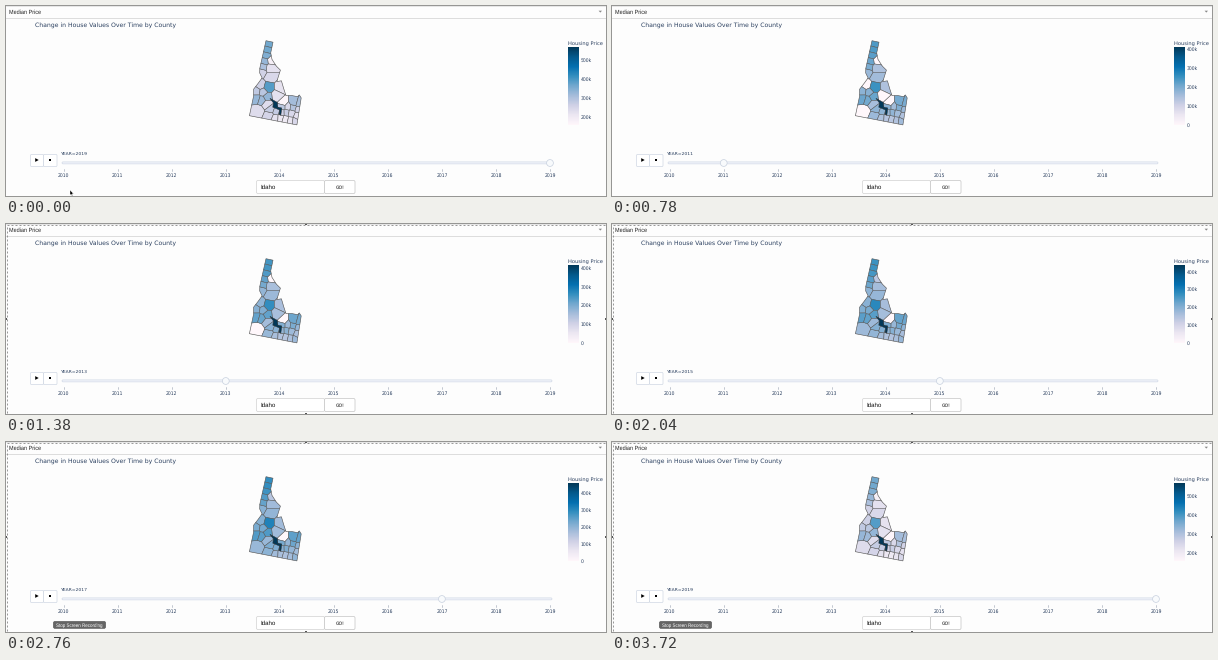
A matplotlib script that plays this animation: 600x190 px, repeating every 3.78 s.

```python
import numpy as np
import matplotlib.pyplot as plt
from matplotlib.animation import FuncAnimation
from matplotlib.patches import Circle, FancyBboxPatch, Polygon, Rectangle

W, H, DPI = 600, 190, 100
FRAMES, INTERVAL = 63, 60
PX = 72 / DPI
INK, RAIL = "#2a3f5f", "#c8d1df"
CMAP = plt.get_cmap("PuBu")
BAR_TOP, BAR_END = 41.5, 119.3
plt.rcParams["text.hinting"] = "none"

# State border, clockwise from the north-west corner
STATE = [(260, 34.7), (267, 36.2), (264.7, 46.9), (266, 53.4), (270.4, 60.2),
         (274.4, 64.1), (270.8, 75.6), (275.4, 74.8), (277.7, 82.6), (280, 89.7),
         (285.6, 89.5), (291.7, 90.7), (293.3, 88.9), (295.2, 91.9), (290.9, 118.9),
         (243.4, 109.7), (247.6, 90.1), (247.6, 83.2), (251.8, 77.8), (256.1, 71.9),
         (253.7, 67), (253.8, 62.3)]
BLAINE = [(263.9, 92.3), (271.5, 96.5), (271.8, 101.2), (275.8, 102), (274.8, 109.2),
          (273, 108.2), (273.6, 104), (266.8, 101.2), (267.4, 96.9)]
# Large counties: centre, 2019 price in thousands, first year with data
LARGE = {
    "Shoshone": (265, 54.5, 185, 2014), "Nez Perce": (256, 66, 260, 2010),
    "Clearwater": (264, 62, 225, 2010), "Idaho": (264, 70.5, 245, 2010),
    "Adams": (254.5, 79.5, 265, 2013), "Valley": (262, 81.5, 390, 2010),
    "Lemhi": (275, 81.5, 222, 2010), "Custer": (271, 90, 225, 2012),
    "Boise": (261, 91, 330, 2010), "Elmore": (261, 98, 235, 2010),
    "Owyhee": (252, 104.5, 235, 2014), "Butte": (277.5, 97, 165, 2019),
}


def small_counties():
    """Centres and prices of the panhandle stack and two jittered grids."""
    rng = np.random.default_rng(4)
    corner, east, north = np.array([(243.4, 109.7), (0.982, 0.19), (0.219, -0.976)])
    for y in np.linspace(38, 61, 5):
        yield 263 - 0.25 * (y - 38), y, 365 - 4 * max(0, y - 46), 2010

    def grid(cols, rows):
        for s in cols:
            for t in rows:
                ds, dt = rng.uniform(-0.9, 0.9, 2)
                yield s, t, corner + (s + ds) * east + (t + dt) * north

    for s, t, (x, y) in grid((2.5, 8), (18.5, 25)):
        yield x, y, 250 + 80 * rng.random(), 2010
    for s, t, (x, y) in grid(np.arange(20, 47, 5.2), np.arange(3.5, 22, 6)):
        if t < 0.45 * s + 4:
            yield x, y, 180 + 4 * t + 60 * rng.random(), 2010


def clip(poly, mid, normal):
    """Keep the part of a convex polygon behind the line through mid."""
    side = (poly - mid) @ normal
    out = []
    for i in range(len(poly)):
        a, b, da, db = poly[i - 1], poly[i], side[i - 1], side[i]
        if da * db < 0:
            out.append(a + (b - a) * da / (da - db))
        if db <= 0:
            out.append(b)
    return np.array(out)


def cell(i, centres):
    """Area nearer to centre i than to any other centre."""
    poly = np.array([(230, 25), (305, 25), (305, 130), (230, 130)], float)
    for j, other in enumerate(centres):
        if j != i:
            poly = clip(poly, (centres[i] + other) / 2, other - centres[i])
    return poly


fig = plt.figure(figsize=(W / DPI, H / DPI), dpi=DPI, facecolor="#fdfdfd")
ax = fig.add_axes([0, 0, 1, 1])


def text(x, y, s, px, color=INK, ha="left", font="DejaVu Sans", **kw):
    return ax.text(x, y, s, size=px * PX, color=color, ha=ha, va="baseline",
                   family=font, **kw)


def line(xs, ys, color, px, **kw):
    return ax.plot(xs, ys, color=color, lw=px * PX, **kw)[0]


def shape(points, fill, edge="none", px=0.0, **kw):
    return ax.add_patch(Polygon(points, fc=fill, ec=edge, lw=px * PX, **kw))


def box(x0, y0, x1, y1, fill, edge, px=0.7, r=1.0):
    style = f"round,pad=0,rounding_size={r}"
    return ax.add_patch(FancyBboxPatch((x0, y0), x1 - x0, y1 - y0, boxstyle=style,
                                       fc=fill, ec=edge, lw=px * PX))


def year_x(year):
    return 57.7 + 54.03 * (year - 2010)


# Colour bar
ax.imshow(np.linspace(1, 0, 160)[:, None], cmap=CMAP, vmin=0, vmax=1,
          extent=(562, 573, BAR_END, BAR_TOP), aspect="auto", interpolation="bilinear")
ax.set(xlim=(0, W), ylim=(H, 0))
ax.set_autoscale_on(False)
ax.axis("off")
text(562, 38.6, "Housing Price", 5.1)
bar_ticks = [text(574.3, 0, "0" if v == 0 else f"{v}k", 4.5) for v in range(0, 600, 100)]

# Dropdown and title
text(3, 7.6, "Median Price", 5.55, "#222222", font="Liberation Sans")
line([0, W], [11.5, 11.5], "#d6d6d6", 0.8)
line([0, W], [0.4, 0.4], "#dddddd", 0.7)
shape([(592.6, 4.7), (596, 4.7), (594.3, 6.6)], "#888888")
text(29.3, 20.6, "Change in House Values Over Time by County", 6.2)

# Map
counties = list(LARGE.values()) + list(small_counties())
centres = np.array([c[:2] for c in counties])
border_line = shape(STATE, "none", "#555555", 0.6, zorder=3)
areas = []
for i in range(len(counties)):
    area = shape(cell(i, centres), "white", "#555555", 0.5)
    area.set_clip_path(border_line)
    areas.append(area)
shape(BLAINE, CMAP(1.0), "#333333", 0.5, zorder=2)

# Playback buttons and slider
box(24.5, 148.5, 37.5, 160.5, "white", RAIL, 0.6)
box(37.5, 148.5, 51, 160.5, "white", RAIL, 0.6)
shape([(29.2, 152.1), (29.2, 155.9), (32.7, 154)], "black")
ax.add_patch(Rectangle((43, 152.8), 2.4, 2.4, fc="black", lw=0))
label = text(54, 150.3, "", 4.45)
box(56, 155.9, 546, 157.9, "#f1f4fa", "#cdd5e4", 0.6)
for year in range(2010, 2020):
    line([year_x(year)] * 2, [163.2, 165], "#8a94a6", 0.5)
    text(year_x(year), 170.7, str(year), 4.5, ha="center")
knob = ax.add_patch(Circle((0, 157), 3.4, fc="#f8fafc", ec=RAIL, lw=0.7 * PX, zorder=4))

# State entry form
box(250.5, 174.5, 318.5, 187.5, "white", "#d1d1d1", r=1.4)
box(318.5, 174.5, 349, 187.5, "white", "#c4c4c4", r=1.4)
text(254, 183.2, "Idaho", 6.1, "#111111", font="Liberation Sans")
text(333.7, 182.8, "GO!", 4.6, "#555555", "center", "Liberation Sans", weight="bold")

# Selection border, tooltip and pointer
border = [line([0.5, 599.5, 599.5, 0.5, 0.5], [0.5, 0.5, 189.5, 189.5, 0.5], "#808080", 0.8,
               dashes=(2.5, 2.5), zorder=6)]
border += [ax.add_patch(Rectangle((x - 0.7, y - 0.7), 1.4, 1.4, fc="#555555", lw=0, zorder=6))
           for x, y in [(0.5, 95), (599.5, 95), (300, 0.5), (300, 189.5)]]
tooltip = [box(47.3, 179.3, 99.7, 186.5, "#656565", "#555555", 0.5, 1.8),
           text(73.5, 184.5, "Stop Screen Recording", 4.5, "white", "center",
                "Liberation Sans")]
ARROW = np.array([(0, 0), (0, 5.2), (1.2, 4.2), (2, 6), (2.8, 5.6), (2, 3.9), (3.6, 3.9)])
pointer = shape(ARROW, "black", "white", 0.4, zorder=7)


def year_at(k):
    return 2019 if k < 4 else min(2019, 2010 + int((k - 3.5) / 5.5))


def top_price(year):
    return np.interp(year, [2010, 2013, 2017, 2018, 2019], [405, 415, 456, 541, 568])


def share(price, first, year):
    """Position of a county's price on the colour scale."""
    if year == 2019:
        return (price - 158) / 410
    if year < first:
        return 0
    return price / 568 * (0.88 + 0.015 * (year - 2010))


def draw(k):
    year = year_at(k)
    low = 158 if year == 2019 else 0
    for area, (_, _, price, first) in zip(areas, counties):
        area.set_facecolor(CMAP(float(share(price, first, year))))
    for i, tick in enumerate(bar_ticks):
        part = (100 * i - low) / (top_price(year) - low)
        tick.set_visible(0 <= part <= 1)
        tick.set_y(BAR_END - part * (BAR_END - BAR_TOP) + 1.6)
    label.set_text(f"YEAR={year}")
    knob.center = year_x(year_at(k - 1) if k else year), 157

    for part in border:
        part.set_visible(k >= 20)
    for part in tooltip:
        part.set_visible(k >= 44)
    x = np.interp(k, [0, 3, 5, 8], [64, 30, 30, 50])
    y = np.interp(k, [0, 3, 5, 8], [184, 154, 154, 192])
    pointer.set_xy(ARROW + [x, y])
    pointer.set_visible(k < 8)
    return []


anim = FuncAnimation(fig, draw, frames=FRAMES, interval=INTERVAL, repeat=True,
                     repeat_delay=0, init_func=lambda: draw(0), blit=False)
plt.show()
```
